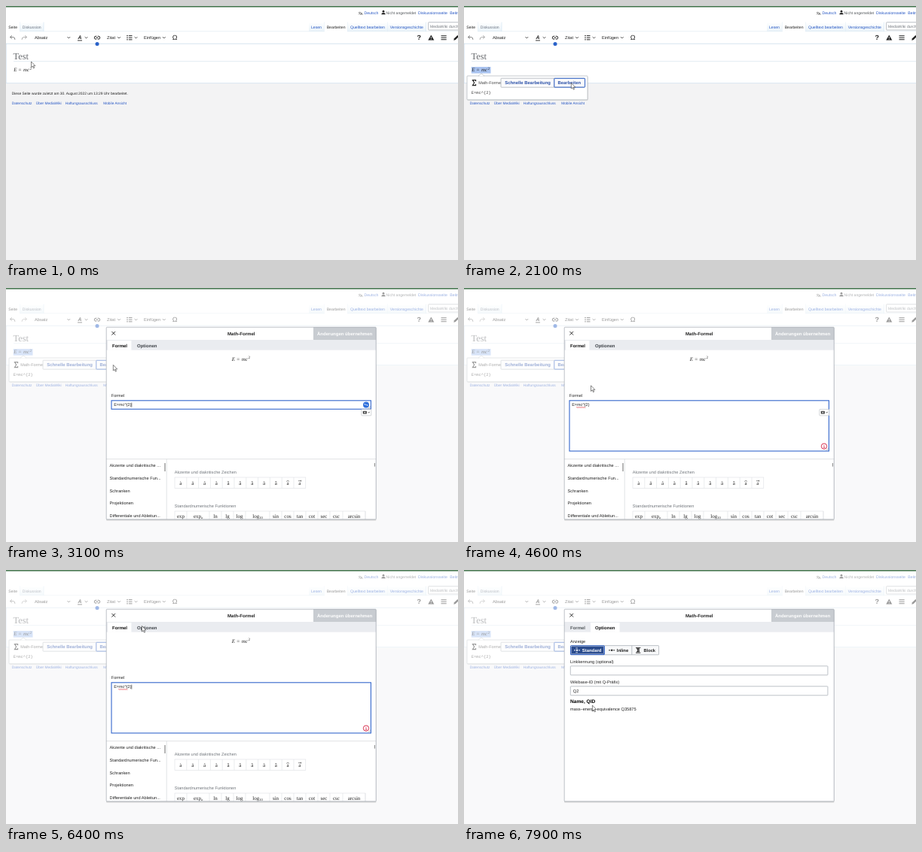
An HTML page for the animation above (8 s loop, 600 by 338 pixels).

```html
<!DOCTYPE html>
<html lang="de">
<head>
<meta charset="utf-8">
<title>Math-Formel</title>
<style>
html, body { margin: 0; width: 100%; height: 100%; overflow: hidden; background: #fff; }
svg { display: block; width: 600px; height: 338px; }
text { font-family: "Liberation Sans", Arial, sans-serif; text-rendering: geometricPrecision; white-space: pre; }
.serif { font-family: "Liberation Serif", serif; }
.mono { font-family: "Liberation Mono", monospace; }
.b { font-weight: bold; }
.i { font-style: italic; }
.mid { text-anchor: middle; }
</style>
</head>
<body>
<svg id="stage" viewBox="0 0 600 338" xmlns="http://www.w3.org/2000/svg"></svg>
<script>
const LINK = '#2455c3', INK = '#222', GREY = '#a2a9b1', BLUE = '#36c';

// Markup helpers
const text = (x, y, s, size, fill = INK, cls = '') =>
  `<text x="${x}" y="${y}" font-size="${size}" fill="${fill}" class="${cls}">${s}</text>`;
const rect = (x, y, w, h, fill, stroke = 'none', sw = 0.6, rx = 0) =>
  `<rect x="${x}" y="${y}" width="${w}" height="${h}" fill="${fill}" stroke="${stroke}" stroke-width="${sw}" rx="${rx}"/>`;
const path = (d, stroke = INK, sw = 0.8, fill = 'none') =>
  `<path d="${d}" stroke="${stroke}" stroke-width="${sw}" fill="${fill}"/>`;
const dot = (x, y, r, fill, stroke = 'none', sw = 0.8) =>
  `<circle cx="${x}" cy="${y}" r="${r}" fill="${fill}" stroke="${stroke}" stroke-width="${sw}"/>`;
const group = (id, body, attr = '') => `<g id="${id}" ${attr}>${body}</g>`;
const chevron = (x, y = 42) => path(`M${x - 1.8} ${y - 0.9}l1.8 1.8l1.8-1.8`);

const formula = (x, y, size) => {
  const k = size / 7;
  return [['E', 0, 'i'], ['=', 6.4, ''], ['m', 12.9, 'i'], ['c', 18, 'i']]
    .map(([s, dx, c]) => text(x + dx * k, y, s, size, INK, 'serif ' + c)).join('') +
    text(x + 21.6 * k, y - 2.7 * k, '2', 5 * k, INK, 'serif');
};

const sigma = (x, y, w, h) =>
  path(`M${x + w} ${y + 1.6}V${y}H${x}L${x + w * 0.55} ${y + h / 2}L${x} ${y + h}H${x + w}V${y + h - 1.6}`, INK, 1.1);

function pageHead() {
  const tab = (x, w, on) => rect(x, 21.5, w, 12.3, on ? '#fff' : 'url(#tab)') +
    path(`M${x + w} 21.5V34`, '#cfe3f1', 0.6);
  return rect(0, 0, 600, 50, '#fff') +
    text(467.5, 11, '文', 4, INK) + text(470.6, 11.6, 'A', 4.6, INK) +
    text(475.5, 11, 'Deutsch', 5.13, LINK) +
    dot(501, 7.2, 1.4, INK) + path('M498.4 11.3q0-2.4 2.6-2.4t2.6 2.4z', 'none', 0, INK) +
    text(504.6, 11, 'Nicht angemeldet', 5.1, '#54595d') +
    text(547, 11, 'Diskussionsseite', 5.22, LINK) + text(589.3, 11, 'Beiträge', 5.22, LINK) +
    tab(0, 18.5, 1) + tab(18.5, 31.5) + tab(402, 20.5) + tab(422.5, 31, 1) + tab(453.5, 53) + tab(506.5, 51) +
    path('M18.5 33.8H422.5M453.5 33.8H600', '#d3e3ee', 0.6) +
    text(3.3, 30, 'Seite', 5.13) + text(21.8, 30, 'Diskussion', 5.13, '#6b7380') +
    text(405, 30, 'Lesen', 5.13, LINK) + text(425.7, 30, 'Bearbeiten', 5.13) +
    text(457, 30, 'Quelltext bearbeiten', 5.13, LINK) + text(509.7, 30, 'Versionsgeschichte', 5.13, LINK) +
    rect(560.6, 21.6, 50, 10.4, '#fff', GREY, 0.7, 0.8) + text(563, 29, 'MediaWiki durchsuchen', 5.1, '#72777d');
}

function toolbar() {
  return rect(0, 34.2, 600, 15.8, '#fff') + path('M0 50.2H600', '#c3d9ea', 0.7) +
    path('M7.8 39.2l-2.3 2.2l2.3 2.2M5.7 41.4h3.6q2.6 0 2.6 3.4', '#666') +
    path('M25.2 39.2l2.3 2.2l-2.3 2.2M27.3 41.4h-3.6q-2.6 0-2.6 3.4', '#999') +
    text(38, 44.2, 'Absatz', 5.65) + chevron(83.3) +
    text(95.4, 44.2, 'A', 6.8, INK, 'b i') + path('M95 45.9h6', INK, 0.9) + chevron(106.5) +
    path('M120.3 40.2h-1a2 2 0 0 0 0 4h1M121.7 40.2h1a2 2 0 0 1 0 4h-1M119.4 42.2h3.2', INK, 1) +
    text(134, 44.2, 'Zitat', 5.65) + chevron(150) +
    [39.6, 42.2, 44.8].map(y => dot(161, y, 0.8, INK) + path(`M162.9 ${y}h4.6`, INK, 1)).join('') + chevron(172.5) +
    text(183, 44.2, 'Einfügen', 5.6) + chevron(209.8) +
    text(224, 45, 'Ω', 9, INK, 'mid') +
    text(548.2, 45.2, '?', 9, INK, 'mid b') +
    path('M564.3 38.6l4 7h-8z', 'none', 0, INK) + path('M564.3 41v2.2M564.3 43.8v0.9', '#fff', 0.8) +
    path('M577.5 39.7h7.2M577.5 42.2h7.2M577.5 44.7h7.2', INK, 1) +
    path('M594.3 45.7l.6-2.4l4.4-4.4l1.8 1.8l-4.4 4.4z', 'none', 0, INK) +
    dot(121, 50.5, 2.5, '#2a62c9');
}

function page() {
  return rect(0, 0, 600, 338, '#f3f3f4') + pageHead() +
    rect(0, 50, 600, 52.6, '#fff') + path('M0 102.6H600M.3 50V102.6', '#cfe0f0', 0.7) +
    text(9.6, 70.6, 'Test', 12.4, '#6a6c70', 'serif') +
    path('M10 73.6H600', '#d8e4ee', 0.7) + toolbar() +
    group('pick', rect(9.8, 81, 25.7, 8.6, '#a9c3f0')) + formula(10.2, 87.4, 6.9) +
    text(7.8, 118.4, 'Diese Seite wurde zuletzt am 30. August 2022 um 13:29 Uhr bearbeitet.', 4.85) +
    [[7.8, 'Datenschutz'], [39.8, 'Über MediaWiki'], [78.8, 'Haftungsausschluss'], [129.2, 'Mobile Ansicht']]
      .map(([x, s]) => text(x, 131, s, 4.8, LINK)).join('');
}

function popup() {
  return rect(4.6, 94.2, 160, 31.6, '#000', 'none', 0, 1).replace('/>', ' opacity=".12"/>') +
    rect(4, 93, 160, 31.8, '#fff', GREY, 0.6, 0.8) +
    path('M19 93.3l4-3.6l4 3.6', GREY, 0.6, '#fff') +
    sigma(11.4, 98.6, 4.2, 7) + text(19.3, 104.2, 'Math-Forme', 5.45, '#444') +
    rect(49, 96.2, 111.4, 12, '#fbfbfc', GREY, 0.7, 0.7) + path('M119.6 96.2v12', GREY, 0.7) +
    text(54.2, 104.1, 'Schnelle Bearbeitung', 5.95, '#2a50a8', 'b') +
    text(124.5, 104.1, 'Bearbeiten', 5.92, '#2a50a8', 'b') +
    group('focus', rect(119.8, 96.3, 40.8, 11.8, 'none', BLUE, 1, 0.7)) +
    text(9.8, 117, 'E=mc^{2}', 5.4, '#444', 'mono');
}

function symbols() {
  const marks = ['ȧ', 'ä', 'á', 'à', 'ǎ', 'ă', 'ã', 'ā', 'â', 'a', 'a'];
  const step = 15.8;
  const fns = [['exp', 224, 240], ['exp', 240, 270, 'a'], ['ln', 270, 286], ['lg', 286, 302], ['log', 302, 318],
    ['log', 318, 350, '10'], ['sin', 350, 366], ['cos', 366, 382], ['tan', 382, 398], ['cot', 398, 414],
    ['sec', 414, 430], ['csc', 430, 447], ['arcsin', 447, 477]];
  const side = ['Akzente und diakritische ...', 'Standardnumerische Fun...', 'Schranken', 'Projektionen', 'Differentiale und Ableitun...'];
  return path('M133 227.6H491M213.2 227.6V308', '#d5d8dc', 0.7) +
    side.map((s, k) => text(137.6, 238.3 + 16.6 * k, s, 5.65)).join('') +
    rect(210.4, 233, 1.2, 11, '#888') + rect(488.9, 233, 1, 4.6, '#888') +
    text(223.8, 246.8, 'Akzente und diakritische Zeichen', 5.6, '#72777d') +
    rect(224, 252, step * 11, 14.4, '#fff', '#dcdfe3', 0.6) +
    marks.map((s, k) => {
      const x = 224 + step * k;
      return (k ? path(`M${x} 252v14.4`, '#dcdfe3', 0.6) : '') + text(x + step / 2, 261.6, s, 7, INK, 'serif mid');
    }).join('') +
    path('M372.2 257.4l1.9-1.1l1.9 1.1M388 256.6h4M391 255.7l1.1.9l-1.1.9', INK, 0.5) +
    text(223.8, 291.6, 'Standardnumerische Funktionen', 5.65, '#72777d') +
    rect(224, 297, 253, 14, '#fff', '#dcdfe3', 0.6) +
    fns.map(([s, a, b, sub]) => path(`M${b} 297v14`, '#dcdfe3', 0.6) +
      text((a + b) / 2, 306, s + (sub ? `<tspan font-size="4.4" dy="1.2">${sub}</tspan>` : ''), 7, INK, 'serif mid')).join('');
}

function formulaTab() {
  return formula(299.8, 96.8, 7) + text(139.8, 145.4, 'Formel', 5.55) +
    '<rect id="field" x="140" y="149.8" width="344.4" fill="#fff"/>' +
    text(143.2, 157.4, 'E=mc^{2}', 5.45) +
    group('wave', path('M149.2 158.9' + 'q.5-.9 1 0t1 0'.repeat(6), '#e0303a', 0.8)) +
    group('caret', path('M166.8 152.6v6', INK, 0.6)) +
    group('grip', path('M480.4 160.6l3.4-3.4M482.2 160.6l1.6-1.6', '#888', 0.5)) +
    group('busy', dot(478, 155.4, 4, '#2f6fdb') + [-1.8, 0, 1.8].map(d => dot(478 + d, 155.4 + d / 3, 0.7, '#fff')).join('')) +
    group('keys', rect(471.8, 161.4, 13, 8.4, '#fff', '#b8bcc2', 0.6, 0.8) +
      rect(473.8, 163.8, 5, 3.6, '#444', 'none', 0, 0.5) + dot(476.3, 165.6, 0.9, '#fff') + path('M480.6 165l1.1 1.1l1.1-1.1', INK, 0.7)) +
    group('alert', dot(478, 210.6, 3.7, '#fff', '#d9304f', 1) + text(478, 212.5, '1', 5.2, '#d9304f', 'mid b')) +
    symbols();
}

function optionsTab() {
  const icon = x => path(`M${x - 4} 106.8h2M${x + 2} 106.8h2`, 'currentColor', 1) + dot(x, 106.8, 1.2, 'currentColor');
  return text(141, 96.8, 'Anzeige', 5.6) +
    rect(141.4, 100.6, 117.2, 12.2, '#f8f9fa', GREY, 0.7, 0.7) + path('M222.8 100.6v12.2', GREY, 0.7) +
    rect(141.6, 100.8, 44.8, 11.8, '#2a4b8d', BLUE, 1, 0.7) + rect(142.5, 101.7, 43, 10, 'none', '#fff', 0.4) +
    `<g color="#fff">${icon(150)}</g><g color="${INK}">${icon(196.2)}</g>` +
    path('M148.2 103.9h2.8M148.2 109.7h2.8', '#fff', 0.7) +
    path('M228 103.4h6.4M228 110.2h6.4', INK, 0.9) + sigma(229.8, 104.9, 2.6, 3.8) +
    text(156.8, 108.8, 'Standard', 5.9, '#fff', 'b') + text(202.8, 108.8, 'Inline', 5.9, INK, 'b') + text(238.4, 108.8, 'Block', 5.75, INK, 'b') +
    text(141, 123.8, 'Linkkennung (optional)', 5.7) + rect(141.3, 127.8, 341.6, 12, '#fff', GREY, 0.7, 0.7) +
    text(141, 151, 'Wikibase-ID (mit Q-Präfix)', 5.62) + rect(141.3, 154.8, 341.6, 12, '#fff', GREY, 0.7, 0.7) +
    text(144.8, 162.8, 'Q2', 5.6) +
    text(141, 176.8, 'Name, QID', 6.6, '#000', 'b') + text(141, 186.8, 'mass–energy equivalence Q35875', 5.68);
}

function dialog() {
  return rect(133, 53, 358.4, 256.4, '#000', 'none', 0, 1).replace('/>', ' opacity=".16"/>') +
    '<g clip-path="url(#frame)">' + rect(133, 52, 358.4, 256, '#fff') +
    path('M140.3 57.8l4.8 4.8M145.1 57.8l-4.8 4.8', INK, 0.9) +
    text(312.3, 62.6, 'Math-Formel', 6.08, INK, 'mid b') +
    rect(408, 52, 84, 17, '#c8ccd1') + text(413, 62.6, 'Änderungen übernehmen', 6.03, '#fff', 'b') +
    rect(133, 69, 359, 13.6, '#eaecf0') + '<rect id="tabOn" y="70" height="12.8" fill="#fff"/>' +
    '<text id="tabA" x="141" y="78.8" font-size="6" class="b">Formel</text>' +
    '<text id="tabB" x="174" y="78.8" font-size="6.02" class="b">Optionen</text>' +
    group('formulaTab', formulaTab()) + group('optionsTab', optionsTab()) + '</g>' +
    rect(133.2, 52.2, 358, 255.6, 'none', GREY, 0.7, 0.8);
}

document.getElementById('stage').innerHTML =
  '<defs><linearGradient id="tab" x1="0" y1="0" x2="0" y2="1"><stop offset="0" stop-color="#fff"/><stop offset="1" stop-color="#eaf3f9"/></linearGradient>' +
  '<clipPath id="frame"><rect x="133" y="52" width="358.4" height="256" rx="1"/></clipPath></defs>' +
  page() + group('popup', popup()) + group('veil', rect(0, 0, 600, 338, '#fff')) +
  group('dialog', dialog()) + rect(0, 0, 600, 1.6, '#4b7a55') +
  group('cursor', path('M0 0V7.6L1.8 6L3 8.8L4.2 8.3L3 5.6H5.4Z', '#333', 0.6, '#fff'));

const el = {};
document.querySelectorAll('#stage [id]').forEach(n => el[n.id] = n);
const show = (id, on) => el[id].setAttribute('display', on ? 'inline' : 'none');
const set = (id, attrs) => { for (const k in attrs) el[id].setAttribute(k, attrs[k]); };

// Pointer stops: time, x, y
const stops = [[0, 33.5, 74], [100, 33.5, 74], [700, 27, 85], [1150, 27, 85], [1850, 142.3, 102.4], [4230, 142.3, 102.4],
  [4580, 168.5, 129.8], [4880, 168.5, 129.8], [5700, 178.6, 105], [6000, 180.4, 74.4], [7050, 180.4, 74.4],
  [7850, 170.4, 180], [8000, 170.4, 180]];

function pointer(t) {
  const k = stops.findIndex(s => s[0] > t);
  const [a, b] = [stops[k - 1], stops[k]];
  const u = (t - a[0]) / (b[0] - a[0]), e = u * u * (3 - 2 * u);
  return [a[1] + (b[1] - a[1]) * e, a[2] + (b[2] - a[2]) * e];
}

const OPEN = 2500, FOCUS = 2960, GROW = 3450, CHECK = 3900, SWITCH = 6600;

function draw(t) {
  show('pick', t >= 700);
  show('popup', t >= 700);
  show('focus', t >= 2100);

  const p = 1 - Math.pow(1 - Math.min(1, Math.max(0, (t - OPEN) / 370)), 2.3);
  set('veil', { opacity: p * 0.55 });
  set('dialog', { opacity: p, transform: `translate(312 180) scale(${0.5 + p / 2}) translate(-312 -180)` });
  show('dialog', p > 0);

  const focused = t >= FOCUS, tall = t >= GROW, checked = t >= CHECK, options = t >= SWITCH;
  set('field', { height: tall ? 67.2 : 11.4, stroke: focused ? BLUE : GREY, 'stroke-width': focused ? 1.1 : 0.7 });
  set('grip', { transform: `translate(0 ${tall ? 55.6 : 0})` });
  set('busy', { transform: `translate(0 ${tall ? 55.2 : 0})` });
  show('busy', focused && !checked);
  show('alert', checked);
  show('wave', checked);
  show('keys', focused && t < 5400);
  show('caret', focused && Math.floor((t - FOCUS) / 540) % 2 === 0);

  show('formulaTab', !options);
  show('optionsTab', options);
  set('tabOn', options ? { x: 168, width: 38.6 } : { x: 135, width: 31.4 });
  set('tabA', { fill: options ? '#54595d' : '#111' });
  set('tabB', { fill: options ? '#111' : '#3c4046' });

  set('cursor', { transform: `translate(${pointer(t)})` });
}

function loop() {
  draw(performance.now() % 8000);
  requestAnimationFrame(loop);
}
loop();
</script>
</body>
</html>
```
